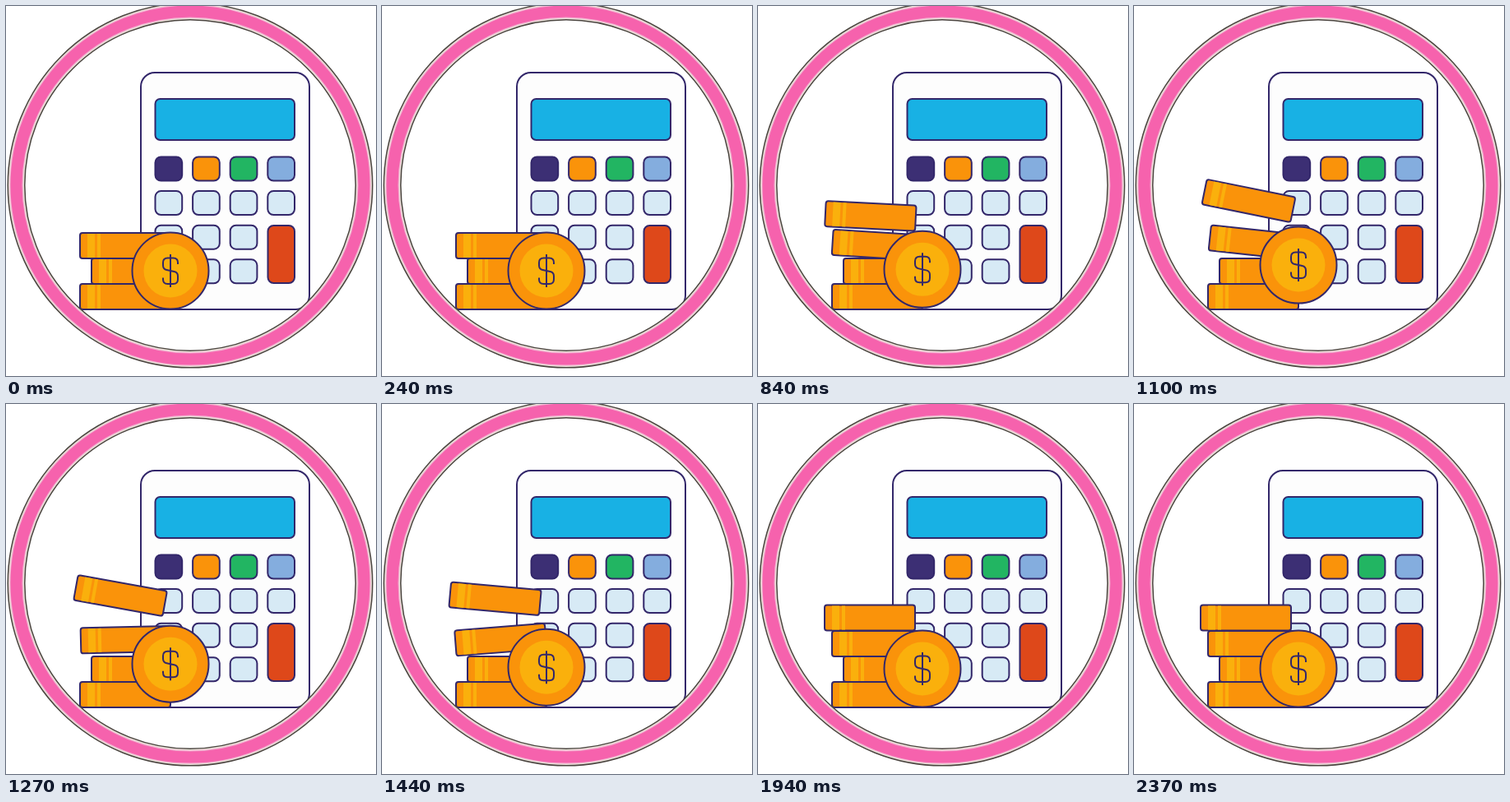
Write an HTML page with a canvas that moves like this. It is 450x450 px and loops after 2800 ms.

```html
<!DOCTYPE html>
<html lang="en">
<head>
<meta charset="utf-8">
<title>Calculator and coins</title>
<style>
html, body { margin: 0; width: 100%; height: 100%; overflow: hidden; background: #fff; }
canvas { display: block; width: 450px; height: 450px; }
</style>
</head>
<body>
<canvas id="stage" width="450" height="450"></canvas>
<script>
const ctx = document.getElementById('stage').getContext('2d');
const LOOP = 2800, STEP = 100 / 3;
const DROP = 600, IMPACT = 780, APEX = 1270, REST = 1940;
const SETTLE = REST - IMPACT;
const INK = '#33276a', COIN = '#fa930a', SHINE = '#fab00c', KEY = '#d7eaf5';

const clamp = v => Math.min(Math.max(v, 0), 1);

// Swing that starts at the impact and fades out by the end of the settling
const sway = (s, size, half, fade) =>
  size * Math.sin(Math.PI * s / half) * (1 - s / SETTLE) ** fade;

// One hop off the ground
const hop = (s, height, time) => height * Math.sin(Math.PI * clamp(s / time));

function box(x, y, w, h, r, fill) {
  ctx.beginPath();
  ctx.roundRect(x, y, w, h, r);
  ctx.fillStyle = fill;
  ctx.fill();
  ctx.strokeStyle = INK;
  ctx.lineWidth = 2;
  ctx.stroke();
}

function disc(x, y, r, fill) {
  ctx.beginPath();
  ctx.arc(x, y, r, 0, Math.PI * 2);
  ctx.fillStyle = fill;
  ctx.fill();
}

function calculator() {
  box(164, 81, 205, 288, 17, '#fdfdfd');
  box(181.5, 113, 169.5, 50, 6, '#18b1e4');
  const heads = ['#3c2f74', COIN, '#22b562', '#84adde'];
  for (let row = 0; row < 4; row++) {
    for (let col = 0; col < 4; col++) {
      if (col === 3 && row > 1) continue;
      box(181.5 + col * 45.6, 183.5 + row * 41.6, 32.7, 29, 7, row ? KEY : heads[col]);
    }
  }
  box(318.5, 267, 32.5, 70, 7, '#de481a');
}

function edgeCoin(x, y, deg = 0) {
  ctx.save();
  ctx.translate(x, y);
  ctx.rotate(deg * Math.PI / 180);
  box(-55, -15.5, 110, 31, 3, COIN);
  ctx.fillStyle = SHINE;
  ctx.fillRect(-46, -14.5, 9, 29);
  ctx.fillRect(-34, -14.5, 4, 29);
  ctx.restore();
}

function dollarCoin(x, y) {
  ctx.save();
  ctx.translate(x, y);
  disc(0, 0, 46.5, COIN);
  ctx.strokeStyle = INK;
  ctx.lineWidth = 2;
  ctx.stroke();
  disc(0, 0, 32.5, SHINE);
  ctx.stroke(new Path2D(
    'M0-20V20 M9-8V-10Q9-15.5 3.5-15.5H-3.5Q-9-15.5-9-10V-6.5' +
    'Q-9-2-4.5-1L4.5 1Q9 2 9 6.5V10.5Q9 16 3.5 16H-3.5Q-9 16-9 10.5V8.5'));
  ctx.restore();
}

function ring() {
  const layer = (width, color) => {
    ctx.beginPath();
    ctx.arc(224, 218, 211.5, 0, Math.PI * 2);
    ctx.lineWidth = width;
    ctx.strokeStyle = color;
    ctx.stroke();
  };
  layer(22, '#4b4540');
  layer(19, '#e9e2d8');
  layer(16.5, '#f3b4d2');
  layer(14, '#f662ad');
}

function topCoin(t, s) {
  if (t < DROP) return;
  if (t < IMPACT) {
    const u = (t - DROP) / (IMPACT - DROP);
    edgeCoin(136, -20 + 280 * u * u);
    return;
  }
  const lift = t < APEX
    ? Math.sin(Math.PI / 2 * s / (APEX - IMPACT))
    : (1 + Math.cos(Math.PI * (t - APEX) / (REST - APEX))) / 2;
  const tilt = sway(s, 14.2, 800, 0.5);
  edgeCoin(136 + 0.3 * tilt, 260 - 27 * lift, tilt);
}

function draw(t) {
  const s = clamp((t - IMPACT) / SETTLE) * SETTLE;
  ctx.fillStyle = '#fff';
  ctx.fillRect(0, 0, 450, 450);
  calculator();
  edgeCoin(145, 353.5);
  edgeCoin(159, 322.5);
  edgeCoin(145 + sway(s, 2, SETTLE / 2, 0), 291.5 - hop(s, 5, SETTLE), sway(s, 10.5, 455, 1));
  topCoin(t, s);
  dollarCoin(200, 322 - hop(s, 7, 710));
  ring();
}

function tick(now) {
  const t = Math.floor((now % LOOP) / 10) * 10;
  draw(t >= REST ? REST : Math.floor(t / STEP + 1e-6) * STEP);
  requestAnimationFrame(tick);
}

draw(0);
requestAnimationFrame(tick);
</script>
</body>
</html>
```
